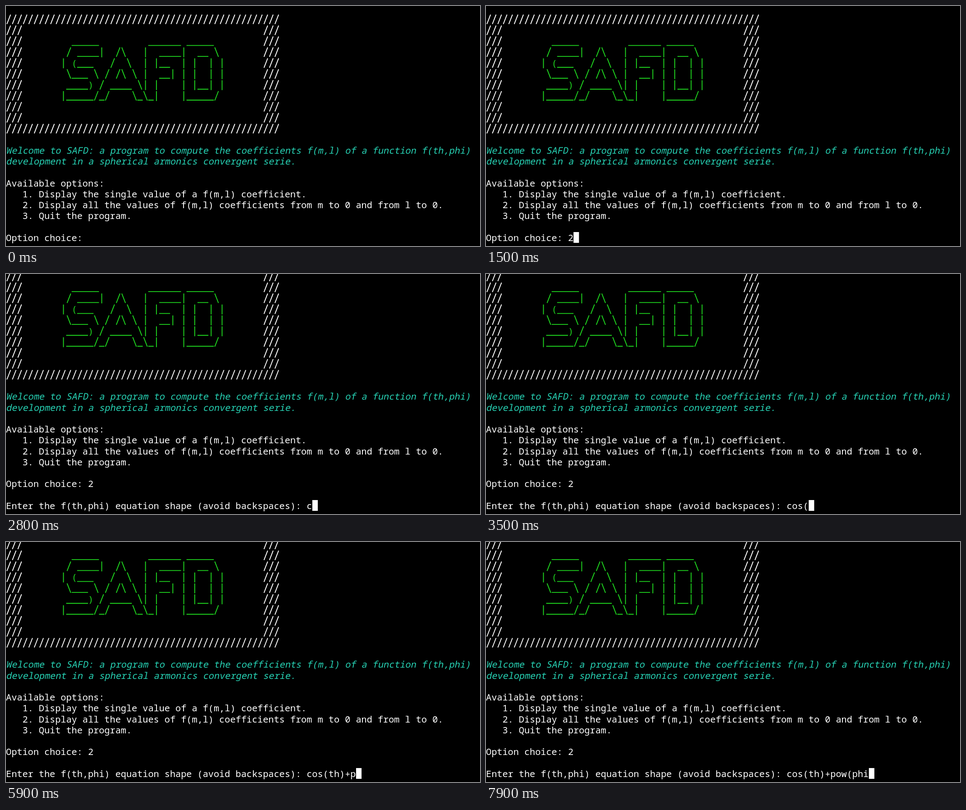
Write an HTML page with a canvas that moves like this. It is 1052x533 px and loops after 8000 ms.

```html
<!DOCTYPE html>
<html lang="en">
<head>
<meta charset="utf-8">
<title>Terminal session</title>
<style>
html, body { margin: 0; width: 100%; height: 100%; overflow: hidden; background: #000; }
canvas { display: block; }
</style>
</head>
<body>
<canvas id="screen" width="1052" height="533"></canvas>
<script>
const ctx = document.getElementById('screen').getContext('2d');
const LOOP = 8000, CELL = 12.14, LINE = 24.27, LAST = 20, BASE = 522;
const WHITE = '#fff', GREEN = '#1fd51f', TEAL = '#27d3b5';

const art = String.raw`

            _____         ______ _____
           / ____|  /\   |  ____|  __ \
          | (___   /  \  | |__  | |  | |
           \___ \ / /\ \ |  __| | |  | |
           ____) / ____ \| |    | |__| |
          |_____/_/    \_\_|    |_____/`.split('\n');

const welcome = [
  'Welcome to SAFD: a program to compute the coefficients f(m,l) of a function f(th,phi)',
  'development in a spherical armonics convergent serie.'
];
const menu = [
  'Available options:',
  '   1. Display the single value of a f(m,l) coefficient.',
  '   2. Display all the values of f(m,l) coefficients from m to 0 and from l to 0.',
  '   3. Quit the program.'
];
const optionPrompt = 'Option choice: ';
const shapePrompt = 'Enter the f(th,phi) equation shape (avoid backspaces): ';

const optionKey = 1000, scrollAt = 1900;
const formula = 'cos(th)+pow(phi';
const formulaKeys = [2800, 3000, 3100, 3500, 3700, 3800, 4100, 5400,
                     5900, 6100, 6200, 6800, 7500, 7700, 7900];
const cursorOff = [[0, 600], [1400, 1500], [2100, 2800], [4700, 5300], [7100, 7400]];

// Banner glyphs as strokes inside a cell: x1, y1, x2, y2 from the baseline
const strokes = {
  '/': [2, 3.5, 10.2, -17.5],
  '\\': [2, -17.5, 10.2, 3.5],
  '|': [6.1, -17.5, 6.1, 4.5],
  '_': [0, 2.5, 12.14, 2.5]
};

const baseline = row => BASE - (LAST - row) * LINE;

function text(str, row, color = WHITE, col = 0, slant = 0) {
  ctx.save();
  ctx.translate(col * CELL, baseline(row));
  ctx.transform(1, 0, -slant, 1, 0, 0);
  ctx.fillStyle = color;
  ctx.fillText(str, 0, 0);
  ctx.restore();
}

function banner(str, row, color) {
  const y = baseline(row);
  ctx.strokeStyle = color;
  ctx.lineWidth = 1.9;
  ctx.beginPath();
  [...str].forEach((ch, col) => {
    const s = strokes[ch], x = col * CELL;
    if (s) {
      ctx.moveTo(x + s[0], y + s[1]);
      ctx.lineTo(x + s[2], y + s[3]);
    } else if (ch !== ' ') {
      text(ch, row, color, col);
    }
  });
  ctx.stroke();
}

function draw(t) {
  const scrolled = t >= scrollAt, top = scrolled ? -2 : 0;
  ctx.fillStyle = '#000';
  ctx.fillRect(0, 0, 1052, 533);
  ctx.font = `${CELL / 0.6}px "Noto Sans Mono", "DejaVu Sans Mono", monospace`;

  for (let i = 0; i <= 10; i++) {
    const edge = i % 10 === 0;
    banner(edge ? '/'.repeat(50) : '///' + ' '.repeat(44) + '///', top + i, WHITE);
  }
  art.forEach((str, i) => banner(str, top + i, GREEN));
  welcome.forEach((str, i) => text(str, top + 12 + i, TEAL, 0, 0.2));
  menu.forEach((str, i) => text(str, top + 15 + i));

  const option = optionPrompt + (t >= optionKey ? '2' : '');
  const typed = formulaKeys.filter(k => t >= k).length;
  const current = scrolled ? shapePrompt + formula.slice(0, typed) : option;
  if (scrolled) text(option, LAST - 2);
  text(current, LAST);

  if (!cursorOff.some(([from, to]) => t >= from && t < to)) {
    ctx.fillStyle = WHITE;
    ctx.fillRect(current.length * CELL, 502, CELL, 24);
  }
}

function frame() {
  draw(performance.now() % LOOP);
  requestAnimationFrame(frame);
}
frame();
</script>
</body>
</html>
```
